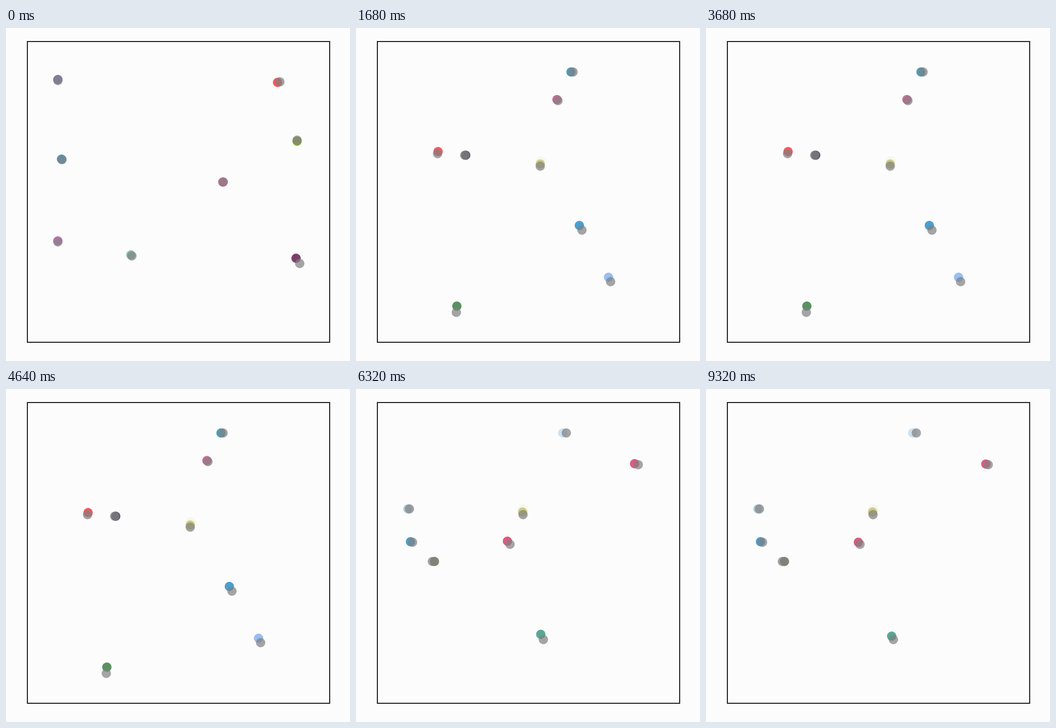
An HTML page with a canvas that plays this animation: 660 by 640 pixels, repeating every 9360 ms.

```html
<!DOCTYPE html>
<html lang="en">
<head>
<meta charset="utf-8">
<title>Agents and goals</title>
<style>
html, body { margin: 0; width: 100%; height: 100%; overflow: hidden; background: #fcfcfc; }
canvas { display: block; }
</style>
</head>
<body>
<canvas id="stage" width="660" height="640"></canvas>
<script>
const ctx = document.getElementById('stage').getContext('2d');
const STEP = 40, LOOP = 9360, RADIUS = 9;
const SETTLE = 280;   // time from the waypoint to the resting place
const NUDGE = 0.35;   // share of the gap closed on every odd step
const REACH = 7.1;    // agents closer than this to their goal stand still

const color = {
  red: '#f8585a', rose: '#de5a80', pink: '#d868a0', orchid: '#d476cc', violet: '#8575b4',
  plum: '#7a406c', slate: '#5c566a', blue: '#4a9fcd', cyan: '#4c9fbc', sky: '#98bff0',
  pale: '#b2d0e2', ice: '#cee1f0', teal: '#58a896', mint: '#90c8b0', green: '#5a9160',
  lime: '#86b030', moss: '#858572', yellow: '#cccb88'
};

// A goal, the agent's lasting offset from it, and an optional waypoint.
const stop = (hue, x, y, dx, dy, via) =>
  ({ hue, goal: [x, y], gap: [dx, dy], rest: [x + dx, y + dy], via });

// In each round all agents set off together for new goals.
const rounds = [
  { start: 0, mid: 0, stops: [
    stop('violet', 99.5, 101, 0, -2),
    stop('red', 525.5, 103.5, -4.5, 1),
    stop('lime', 558.5, 215.5, 0, 2),
    stop('blue', 107.5, 253, -1, -1),
    stop('pink', 417, 296, -1, 0),
    stop('orchid', 99.5, 411, 0, -2),
    stop('mint', 241.5, 438, -2, -2),
    stop('plum', 563.5, 452.5, -7, -10)
  ] },
  { start: 80, mid: 720, stops: [
    stop('slate', 208.5, 244.5, 2, 0, [197.5, 245.5]),
    stop('cyan', 416.5, 84.5, -4, 0),
    stop('pink', 387.5, 139.5, -2, -2),
    stop('red', 156.5, 241.5, 1, -4, [141.5, 241.5]),
    stop('yellow', 353.5, 265.5, 0, -4),
    stop('green', 192.5, 546.5, 1, -12),
    stop('blue', 433.5, 388.5, -5, -9),
    stop('sky', 488.5, 487.5, -4, -8.5)
  ] },
  { start: 4960, mid: 600, stops: [
    stop('teal', 359.5, 481.5, -5, -10, [344.5, 467.5]),
    stop('rose', 295.5, 298.5, -5, -6, [326.5, 224.5]),
    stop('ice', 403.5, 84.5, -7, 0, [376.5, 127.5]),
    stop('blue', 108.5, 294.5, -4, -1, [122.5, 262.5]),
    stop('rose', 541.5, 145.5, -7, -2, [440.5, 234.5]),
    stop('moss', 146.5, 331.5, 4, 0, [157.5, 379.5]),
    stop('pale', 102.5, 230.5, -3, 0, [213.5, 294.5]),
    stop('yellow', 320.5, 241.5, -1, -5, [413.5, 295.5])
  ] }
];

const mix = (a, b, p) => a.map((v, k) => v + (b[k] - v) * p);

function disc([x, y], r, fill) {
  ctx.fillStyle = fill;
  ctx.beginPath();
  ctx.arc(x, y, r, 0, Math.PI * 2);
  ctx.fill();
}

function position(from, to, mid, age, odd) {
  const via = to.via || to.rest;
  if (age < mid) return mix(from, via, age / mid);
  if (age < mid + SETTLE) return mix(via, to.rest, (age - mid) / SETTLE);
  return odd && Math.hypot(...to.gap) > REACH ? mix(to.rest, to.goal, NUDGE) : to.rest;
}

function draw(time) {
  const i = Math.floor((time % LOOP) / STEP), t = i * STEP;
  const n = rounds.findLastIndex(r => t >= r.start);
  const { start, mid, stops } = rounds[n];
  const before = rounds[Math.max(n - 1, 0)].stops;

  ctx.fillStyle = '#fcfcfc';
  ctx.fillRect(0, 0, 660, 640);
  stops.forEach((to, k) => {
    const [x, y] = position(before[k].rest, to, mid, t - start, i % 2);
    if (to.hue === 'yellow') disc([x + 1, y - 5], 10, '#f7f7e8');
    disc([x, y], RADIUS, color[to.hue]);
  });
  for (const { goal } of stops) disc(goal, RADIUS, 'rgba(128,128,128,.71)');
  ctx.strokeStyle = '#222';
  ctx.lineWidth = 2;
  ctx.strokeRect(41, 26, 580, 578);
}

const begin = performance.now();
function tick() {
  draw(performance.now() - begin);
  requestAnimationFrame(tick);
}
tick();
</script>
</body>
</html>
```
